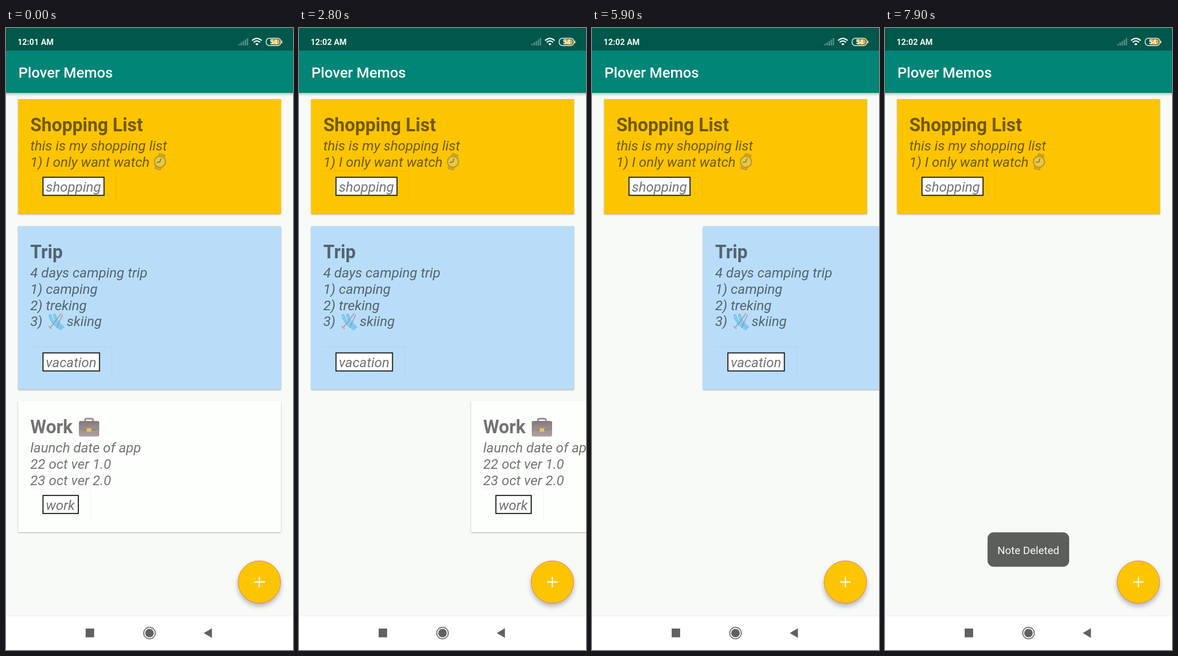
Write an HTML page that moves like this. It is 508 by 1102 pixels and loops after 8000 ms.

```html
<!DOCTYPE html>
<html lang="en">
<head>
<meta charset="utf-8">
<title>Notes</title>
<style>
  html, body { margin: 0; width: 100%; height: 100%; overflow: hidden; background: #f8faf8; }
  svg { display: block; width: 100vw; height: 100vh; font-family: Roboto, sans-serif; }
  text { white-space: pre; }
  .title { font-size: 32.3px; font-weight: 700; fill: rgba(0,0,0,.55); }
  .line { font-size: 24.45px; font-style: italic; fill: rgba(0,0,0,.55); }
  .sheet { filter: drop-shadow(0 1px 1.2px rgba(0,0,0,.32)); }
  .chip { fill: #fefefe; stroke: #111; stroke-width: 1.8; }
  .edge { fill: none; stroke: rgba(0,0,0,.05); stroke-width: 1.2; }
  .status { font-size: 14.6px; font-weight: 700; fill: #f2f7f5; }

  .work, .trip, .toast, .before, .after { animation: 8s infinite; }
  .work { animation-name: work; }
  .trip { animation-name: trip; }
  .toast { animation-name: toast; }
  .before { animation-name: before; animation-timing-function: step-end; }
  .after { animation-name: after; animation-timing-function: step-end; }

  @keyframes work {
    0% { transform: translateX(0); animation-timing-function: step-end; }
    16.25% { transform: translateX(0); animation-timing-function: steps(6); }
    23.75% { transform: translateX(117.5px); animation-timing-function: steps(9); }
    35% { transform: translateX(283px); animation-timing-function: steps(3); }
    38.75% { transform: translateX(338px); animation-timing-function: steps(3); }
    42.5%, 100% { transform: translateX(520px); }
  }
  @keyframes trip {
    0% { transform: translateX(0); animation-timing-function: step-end; }
    61.25% { transform: translateX(0); animation-timing-function: steps(4); }
    66.25% { transform: translateX(48px); animation-timing-function: steps(12); }
    81.25% { transform: translateX(302px); animation-timing-function: steps(3); }
    85% { transform: translateX(365px); animation-timing-function: steps(3); }
    88.75%, 100% { transform: translateX(520px); }
  }
  @keyframes toast {
    0% { opacity: 0; animation-timing-function: step-end; }
    42.5% { opacity: 0; animation-timing-function: steps(3); }
    46.25% { opacity: 1; animation-timing-function: step-end; }
    70% { opacity: 1; animation-timing-function: steps(3); }
    73.75% { opacity: 0; animation-timing-function: step-end; }
    90% { opacity: 0; animation-timing-function: steps(3); }
    93.75%, 100% { opacity: 1; }
  }
  @keyframes before { 0% { opacity: 1; } 31.25%, 100% { opacity: 0; } }
  @keyframes after { 0% { opacity: 0; } 31.25%, 100% { opacity: 1; } }
</style>
</head>
<body>
<svg viewBox="0 0 508 1102">
  <defs>
    <linearGradient id="barShade" x2="0" y2="1">
      <stop stop-color="#000" stop-opacity=".2"/>
      <stop offset="1" stop-color="#000" stop-opacity="0"/>
    </linearGradient>
    <linearGradient id="leather" x2="0" y2="1">
      <stop stop-color="#82767a"/>
      <stop offset=".5" stop-color="#9d9190"/>
      <stop offset="1" stop-color="#ada19f"/>
    </linearGradient>

    <g id="watch" transform="rotate(17)" stroke-linejoin="round">
      <path d="M-5-14H5L6-7H-6ZM-6 7H6L5 14H-5Z" fill="#c5a33c" stroke="#a58a31"/>
      <circle r="9.8" fill="#e4c858" stroke="#b6932f" stroke-width="2.4"/>
      <path d="M0-6V0L-5 3" fill="none" stroke="#6c5d2c" stroke-width="1.5"/>
    </g>
    <g id="skis" fill="none" stroke-linecap="round">
      <path d="M-10-11C-8-2-3 5 9 12M-2-12C0-3 4 4 12 9" stroke="#62bde6" stroke-width="5"/>
      <path d="M-10-11C-8-2-3 5 9 12M-2-12C0-3 4 4 12 9" stroke="#8cd3f2" stroke-width="1.5"/>
      <path d="M9-14L-10 11M12-12L2 10" stroke="#87919a" stroke-width="1.5"/>
      <path d="M9-14L7-11M-12 8L-8 12" stroke="#d39a8f" stroke-width="2.4"/>
    </g>
    <g id="case">
      <path d="M-7-10V-13Q-7-15-5-15H5Q7-15 7-13V-10" fill="none" stroke="#96908f" stroke-width="3"/>
      <rect x="-18" y="-11" width="36" height="27.5" rx="3" fill="url(#leather)"/>
      <path d="M-18 2Q0 8 18 2" fill="none" stroke="#81767a" stroke-width="1"/>
      <rect x="-4" y="2" width="8" height="6" rx="1" fill="#edc159"/>
    </g>
  </defs>

  <rect width="508" height="1102" fill="#f8faf8"/>
  <g id="cards"></g>

  <rect y="115" width="508" height="6" fill="url(#barShade)"/>
  <rect y="39" width="508" height="76" fill="#008577"/>
  <rect width="508" height="40" fill="#00574b"/>
  <text x="22" y="88" font-size="25.9" font-weight="500" fill="#fff">Plover Memos</text>

  <text class="status before" x="20.5" y="30">12:01 AM</text>
  <text class="status after" x="20.5" y="30">12:02 AM</text>
  <path d="M412.5 31V28M416.3 31V25.5M420 31V23M423.7 31V20.500M427.300 31V18" stroke="#fff" stroke-opacity=".34" stroke-width="2.4"/>
  <g fill="none" stroke="#f2f7f5" stroke-width="2.1">
    <path d="M435.500 22.300Q444 14.600 452.500 22.300M438.300 25.500Q444 20.300 449.700 25.500"/>
    <path d="M441 28.300Q444 25.500 447 28.300L444 31Z" fill="#f2f7f5" stroke="none"/>
  </g>
  <rect x="460.500" y="18.200" width="26" height="13" rx="5.500" fill="none" stroke="#eef4f2" stroke-width="1.500"/>
  <path d="M488.300 22.500V27" stroke="#eef4f2" stroke-width="1.500"/>
  <rect x="470" y="20" width="14.500" height="9.400" rx="4" fill="#f0a52c"/>
  <text x="473.800" y="29" text-anchor="middle" font-size="12" font-weight="700" fill="#fff">54</text>

  <rect y="1041" width="508" height="61" fill="#fefffe"/>
  <path d="M0 1041.500H508" stroke="#eceeec"/>
  <g fill="#616161">
    <rect x="141" y="1064" width="15" height="15.500"/>
    <circle cx="254" cy="1072" r="7.600"/>
    <circle cx="254" cy="1072" r="10.300" fill="none" stroke="#616161" stroke-width="1.500"/>
    <path d="M350 1072L364.500 1063.500V1080.500Z"/>
  </g>

  <circle cx="448.500" cy="981.500" r="37.600" fill="#fdc500" stroke="#ea6a4c" stroke-width=".8"
    style="filter: drop-shadow(0 5px 4px rgba(0,0,0,.28))"/>
  <path d="M439 981.500H458M448.500 972V991" stroke="#fffbe8" stroke-width="2.300"/>

  <g class="toast">
    <rect x="181.500" y="893.500" width="144.500" height="61" rx="11" fill="#5c5e5c"/>
    <text x="253.700" y="931.500" text-anchor="middle" font-size="19" fill="#f8f8f8">Note Deleted</text>
  </g>
</svg>
<script>
  const lineStep = 28.7;

  const notes = [
    { name: 'shop', y: 126, fill: '#fdc500', title: 'Shopping List', tag: 'shopping', tagWidth: 108,
      lines: ['this is my shopping list', '1) I only want watch'], icon: ['watch', 272.5, 111, .85] },
    { name: 'trip', y: 351, fill: '#b9ddf9', title: 'Trip', tag: 'vacation', tagWidth: 100,
      lines: ['4 days camping trip', '1) camping', '2) treking', '3)', ''],
      icon: ['skis', 88, 169.5, .85], extra: ['skiing', 107.5, 3] },
    { name: 'work', y: 661, fill: '#fdfffd', title: 'Work', tag: 'work', tagWidth: 62.5,
      lines: ['launch date of app', '22 oct ver 1.0', '23 oct ver 2.0'], icon: ['case', 147, 46.3, 1] }
  ];

  const lineAt = (text, x, row) =>
    `<text class="line" x="${x}" y="${91.2 + row * lineStep}">${text}</text>`;

  function card(note) {
    const chipY = 138.5 + (note.lines.length - 2) * lineStep;
    const [icon, iconX, iconY, alpha] = note.icon;
    return `<g transform="translate(0 ${note.y})"><g class="${note.name}">
      <rect class="sheet" x="21.5" width="465.3" height="${chipY + 65}" rx="1" fill="${note.fill}"/>
      <text class="title" x="43" y="56.5">${note.title}</text>
      ${note.lines.map((text, row) => lineAt(text, 43, row)).join('')}
      ${note.extra ? lineAt(...note.extra) : ''}
      <use href="#${icon}" x="0" y="0" transform="translate(${iconX} ${iconY})" opacity="${alpha}"/>
      <path class="edge" d="M43 ${chipY - 11}H${87.5 + note.tagWidth}v55"/>
      <rect class="chip" x="65.5" y="${chipY}" width="${note.tagWidth}" height="32"/>
      <text class="line" x="70.5" y="${chipY + 25.5}">${note.tag}</text>
    </g></g>`;
  }

  document.getElementById('cards').innerHTML = notes.map(card).join('');
</script>
</body>
</html>
```
